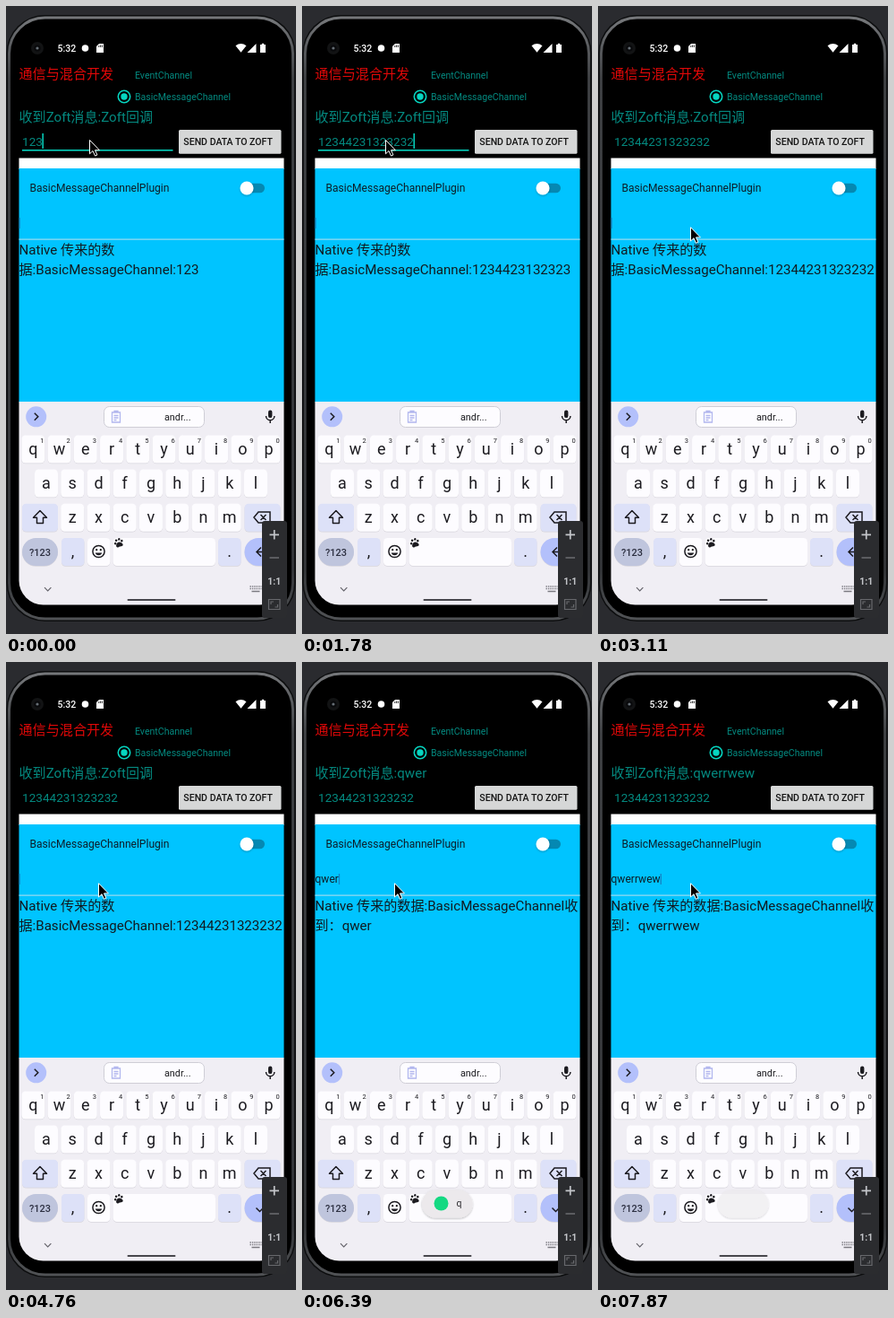
Recreate the animation shown at these times as an HTML page. Size 324 by 700 pixels, loop 8 s.

```html
<!DOCTYPE html>
<html lang="zh-CN">
<head>
<meta charset="utf-8">
<title>Message channel demo</title>
<style>
html, body { margin: 0; width: 100%; height: 100%; overflow: hidden; background: #2a2b2f; }
svg { display: block; width: 100vw; height: 100vh; }
text { font-family: Roboto, "Noto Sans CJK SC", "Noto Sans CJK", sans-serif; white-space: pre; }
.mid { text-anchor: middle; }
.teal { fill: #048a80; }
.radio { font-size: 10.56px; }
.big { font-size: 15.1px; }
.native { font-size: 15.1px; fill: #101a20; }
.input { font-size: 13.6px; }
.body { font-size: 12.07px; fill: #0c1c26; }
.line { fill: none; stroke: #1c1b20; stroke-width: 1.5; }
</style>
</head>
<body>
<svg viewBox="0 0 324 700" preserveAspectRatio="none">
  <defs>
    <clipPath id="screen"><rect x="14.5" y="27" width="296" height="640.5" rx="27"/></clipPath>
    <filter id="soft" x="-20%" y="-20%" width="140%" height="150%">
      <feDropShadow dx="0" dy="1" stdDeviation="1" flood-opacity=".28"/>
    </filter>
    <linearGradient id="metal" x2="0" y2="1">
      <stop offset="0" stop-color="#75777a"/>
      <stop offset=".1" stop-color="#3d3f42"/>
      <stop offset=".92" stop-color="#323437"/>
      <stop offset="1" stop-color="#505255"/>
    </linearGradient>
  </defs>
  <rect width="324" height="700" fill="#2a2b2f"/>

  <!-- phone body -->
  <rect x=".5" y="10" width="323" height="676" rx="43" fill="#0c0d0e"/>
  <rect x="3.5" y="13" width="317" height="670" rx="40" fill="#000" stroke="url(#metal)" stroke-width="3"/>

  <!-- status bar -->
  <circle cx="35" cy="47" r="7" fill="#121314"/>
  <circle cx="35" cy="47" r="3.6" fill="#08090b"/>
  <circle cx="35" cy="47" r="1.6" fill="#666e75"/>
  <text x="57.5" y="51" font-size="10.56" font-weight="500" fill="#fff">5:32</text>
  <circle cx="88.5" cy="47" r="3.8" fill="#fff"/>
  <path d="M104 42h5v10h-8v-7z" fill="#fff"/>
  <path d="M103.8 44v2M105.6 43.4v2.6M107.4 43.4v2.6" stroke="#000" stroke-width=".8"/>
  <path d="M256.5 44.200Q262.500 39.600 268.500 44.200L262.500 51.800z" fill="#fff"/>
  <path d="M279.500 42v10h-10z" fill="#fff"/>
  <path d="M284 43h1.800v-1.200h2.400v1.200h1.800v9h-6z" fill="#fff"/>

  <!-- upper panel -->
  <text class="big" x="14.500" y="81" fill="#e00808">通信与混合开发</text>
  <text class="radio teal" x="144" y="81">EventChannel</text>
  <circle cx="132" cy="101" r="6.700" fill="none" stroke="#06d6c1" stroke-width="1.600"/>
  <circle cx="132" cy="101" r="3.700" fill="#06d6c1"/>
  <text class="radio teal" x="144" y="105">BasicMessageChannel</text>
  <text class="big teal" id="label" x="14.500" y="129"></text>
  <text class="input teal" id="input" x="18" y="155.500"></text>
  <rect id="underline" x="18" y="160" width="168.500" height="1.600" fill="#05d0bc"/>
  <rect id="caret" y="142" width="1.500" height="17" fill="#06d6c1"/>
  <rect x="193" y="138" width="114.500" height="26.700" rx="1.500" fill="#d6d7d7"/>
  <text class="radio" x="198.300" y="155.300" font-weight="500" fill="#151515">SEND DATA TO ZOFT</text>

  <!-- lower panel and keyboard -->
  <g clip-path="url(#screen)">
    <rect x="14" y="169.500" width="297" height="12.500" fill="#fff"/>
    <rect x="14" y="181" width="297" height="260.500" fill="#00c4ff"/>
    <text class="body" x="26.500" y="207">BasicMessageChannelPlugin</text>
    <rect x="264" y="197.700" width="25" height="10.500" rx="5.250" fill="#0588b2"/>
    <circle cx="269" cy="203" r="7.500" fill="#fff" filter="url(#soft)"/>
    <text class="body" id="word" x="14.500" y="246"></text>
    <rect id="wordCaret" y="236" width="1.300" height="12" fill="#1583c4"/>
    <rect x="14" y="259.500" width="297" height="1.200" fill="#9fdcf0"/>
    <text class="native" id="row1" x="14.500" y="277"></text>
    <text class="native" id="row2" x="14.500" y="299"></text>
    <rect x="14" y="441" width="297" height="228" fill="#f0eef4"/>
    <circle cx="33.700" cy="457.800" r="11.500" fill="#b3c0fb"/>
    <path class="line" d="M31.800 453.800l4 4-4 4"/>
    <rect x="109.500" y="446.500" width="112" height="23" rx="6" fill="#fdfcff" stroke="#cfced6"/>
    <path d="M118.500 453h9v11h-9zM121 453v-1.500h4v1.500M120.500 456.500h5M120.500 459h5M120.500 461.500h3" fill="none" stroke="#b2b7ee" stroke-width="1.300"/>
    <text x="177" y="462" font-size="10.800" fill="#1b1b1f">andr...</text>
    <rect x="293" y="450.500" width="4.400" height="8.600" rx="2.200" fill="#1c1b20"/>
    <path class="line" d="M290.500 457a4.700 4.700 0 0 0 9.400 0M295.200 461.700v3.300"/>
    <g id="keys"></g>
    <path class="line" d="M30.500 570.300L38 562.500l7.500 7.800h-4v6.200h-7v-6.200z" stroke-linejoin="round"/>
    <path class="line" d="M282 564h13v12h-13l-5-6zM284.500 567l6 6M290.500 567l-6 6"/>
    <text class="mid" x="38" y="612.500" font-size="11" font-weight="500" fill="#2c2f40">?123</text>
    <circle class="line" cx="103.500" cy="608" r="6.600"/>
    <circle cx="101.200" cy="606.200" r="1.100"/><circle cx="105.800" cy="606.200" r="1.100"/>
    <path d="M99.800 609.500h7.400a3.800 3.400 0 0 1-7.400 0z" fill="#1c1b20"/>
    <g fill="#1c1b20" transform="translate(0 -1) rotate(-18 126 600)">
      <circle cx="122.300" cy="599" r="1.300"/><circle cx="124.300" cy="596" r="1.300"/>
      <circle cx="127.700" cy="595.700" r="1.300"/><circle cx="130" cy="598.300" r="1.300"/>
      <path d="M126 598.600c2 0 4.300 2.600 4 4.200-.400 1.700-2.400.800-4 .900s-3.200.900-3.600-.800 1.600-4.300 3.600-4.300z"/>
    </g>
    <path class="line" id="enter"/>
    <path d="M43 648.200l3.700 3.700 3.700-3.700" fill="none" stroke="#65646b" stroke-width="1.200"/>
    <rect x="135.500" y="661" width="54" height="2" rx="1" fill="#48474d"/>
    <path d="M272.500 647h13M272.500 649.500h13" stroke="#7b7a81" stroke-width="1.300" stroke-dasharray="1.400 1"/>
    <path d="M274.500 652.500h9" stroke="#7b7a81" stroke-width="1.300"/>
    <g id="pill"><rect x="134" y="588.500" width="56.500" height="31" rx="15.500" fill="#ece9ec" filter="url(#soft)"/></g>
    <g id="toast">
      <circle cx="155.500" cy="603.500" r="8" fill="#14d982"/>
      <text x="172.500" y="607" font-size="10.560" fill="#2c2b2f">q</text>
    </g>
  </g>

  <!-- zoom panel -->
  <rect x="286" y="574" width="28" height="108" rx="3" fill="#2b2c2f"/>
  <path d="M294.500 589.300h10.500M299.750 584v10.500" stroke="#c4c6ca" stroke-width="1.700"/>
  <path d="M294.500 615h10.500" stroke="#6b6d71" stroke-width="1.500"/>
  <text class="mid" x="299.700" y="645" font-size="10.500" font-weight="700" fill="#c4c6ca">1:1</text>
  <path d="M293.500 661.500h12.500v11h-12.500zM296 667v-3h3M303.500 667v3h-3" fill="none" stroke="#68696d" stroke-width="1.200"/>

  <path id="mouse" d="M0 0V15.300L3.500 12 6 17.600 8.400 16.500 6 11.200H10.900z" fill="#000" stroke="#fff" stroke-width="1" stroke-linejoin="round"/>
</svg>
<script>
const $ = id => document.getElementById(id);
const LOOP = 8000;
const DIGITS = '12344231323232', WORD = 'qwerrwew';
const ARROW = 'M292 608.500h-12M285 603.500l-5 5 5 5';
const CHECK = 'M279.500 608.500l4 4 8-8';

// keyboard
let keys = '';
function key(x, y, w, fill = '#fdfcff', r = 4.5) {
  keys += `<rect x="${x}" y="${y + .8}" width="${w}" height="31" rx="${r}" fill="#d8d6dd"/>` +
          `<rect x="${x}" y="${y}" width="${w}" height="31" rx="${r}" fill="${fill}"/>`;
}
function glyph(s, x, y, size = 18) {
  keys += `<text class="mid" x="${x}" y="${y}" font-size="${size}" fill="#1c1b20">${s}</text>`;
}
function letters(row, x, y) {
  [...row].forEach((c, i) => {
    const cx = x + i * 29.25;
    key(cx - 13, y, 26);
    glyph(c, cx, y + 21.3);
    if (row.length === 10) glyph((i + 1) % 10, cx + 10, y + 8.7, 7.5);
  });
}
const LILAC = '#dde1f8';
letters('qwertyuiop', 30.3, 478.5);
letters('asdfghjkl', 45, 516.5);
letters('zxcvbnm', 74.2, 554.7);
key(18, 554.7, 40, LILAC);
key(266.5, 554.7, 40, LILAC);
key(18, 593, 40, '#bfc5dd', 15.5);
key(62, 593, 25.5, LILAC);
key(91, 593, 25.5);
key(119.5, 593, 114.5);
key(237, 593, 25.5, LILAC);
key(266.5, 593, 40, '#b3c0fb', 15.5);
glyph(',', 74.5, 613.5);
glyph('.', 249.7, 613.5);
$('keys').innerHTML = keys;

// Each step holds only what changes. typed/shown count digits;
// heard/word/echo count letters in the label, lower field and reply.
const steps = [
  [0, { typed: 3, shown: 3, heard: 0, word: 0, echo: 0, focus: 1, caret: 1, blink: 1,
        check: 0, pill: 0, toast: 0, at: [93.5, 149.5] }],
  [300, { typed: 4, blink: 0 }],
  [450, { typed: 5, shown: 4 }],
  [600, { shown: 5, blink: 1 }],
  [750, { caret: 0 }],
  [1040, { typed: 6, caret: 1 }],
  [1190, { typed: 7, shown: 6, blink: 0 }],
  [1340, { typed: 9, shown: 8 }],
  [1480, { typed: 11, shown: 10 }],
  [1630, { typed: 13, shown: 12, blink: 1 }],
  [1780, { typed: 14, shown: 13 }],
  [1930, { shown: 14 }],
  [2080, { caret: 0 }],
  [2230, { blink: 0, at: [110, 161] }],
  [2380, { at: [149, 192] }],
  [2520, { caret: 1, at: [136, 228] }],
  [2670, { blink: 1, at: [112, 244] }],
  [2810, { at: [103.5, 246.7] }],
  [3110, { focus: 0, caret: 0 }],
  [3260, { blink: 0 }],
  [3410, { check: 1 }],
  [3710, { blink: 1 }],
  [4310, { blink: 0 }],
  [4760, { blink: 1 }],
  [5350, { heard: 1, word: 1, echo: 1 }],
  [5500, { heard: 2, pill: .8, toast: .6 }],
  [5650, { word: 2, echo: 2, pill: 1, toast: 1 }],
  [6100, { heard: 3, word: 3, echo: 3 }],
  [6390, { heard: 4, word: 4, echo: 4 }],
  [6540, { heard: 5, word: 5, echo: 5 }],
  [6980, { blink: 0 }],
  [7280, { heard: 6, word: 6, echo: 6, blink: 1 }],
  [7430, { heard: 7, word: 7 }],
  [7580, { echo: 7 }],
  [7720, { heard: 8, word: 8, echo: 8, pill: .8, toast: .5 }],
  [7870, { pill: .6, toast: 0 }]
];

function setText(id, s) {
  const el = $(id);
  if (el.textContent !== s) el.textContent = s;
  return s ? el.getComputedTextLength() : 0;
}

function draw(t) {
  const s = {};
  for (const [time, change] of steps) if (time <= t) Object.assign(s, change);
  const part = n => WORD.slice(0, n);

  setText('label', '收到Zoft消息:' + (s.heard ? part(s.heard) : 'Zoft回调'));
  $('caret').setAttribute('x', 17.5 + setText('input', DIGITS.slice(0, s.typed)));
  $('wordCaret').setAttribute('x', 14.5 + setText('word', part(s.word)));
  setText('row1', s.echo ? 'Native 传来的数据:BasicMessageChannel收' : 'Native 传来的数');
  setText('row2', s.echo ? '到：' + part(s.echo)
                         : '据:BasicMessageChannel:' + DIGITS.slice(0, s.shown));
  $('caret').style.opacity = s.caret;
  $('underline').style.opacity = s.focus;
  $('wordCaret').style.opacity = s.blink;
  $('pill').style.opacity = s.pill;
  $('toast').style.opacity = s.toast;
  $('enter').setAttribute('d', s.check ? CHECK : ARROW);
  $('mouse').setAttribute('transform', `translate(${s.at})`);
}

function tick() {
  draw(performance.now() % LOOP);
  requestAnimationFrame(tick);
}
tick();
</script>
</body>
</html>
```
